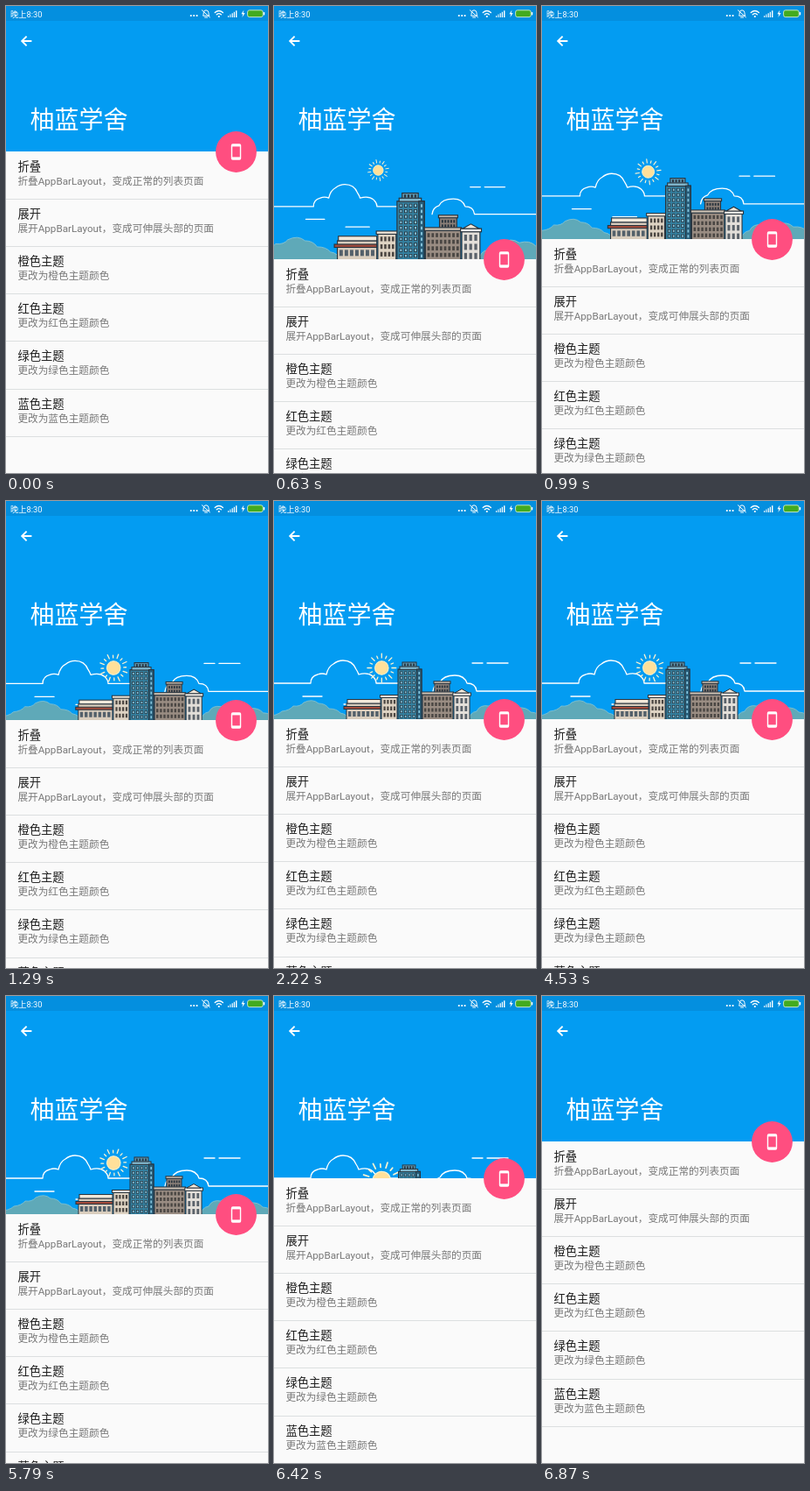
Write an HTML page that moves like this. It is 300 px wide and 533 px high and loops after 6.9 s.

```html
<!DOCTYPE html>
<html lang="zh-CN">
<head>
<meta charset="utf-8">
<title>列表</title>
<style>
html, body { margin: 0; width: 100%; height: 100%; overflow: hidden; background: #fafafa; }
svg { display: block; width: 100%; height: 100%; }
text { font-family: Roboto, "Noto Sans CJK SC", "Noto Sans CJK", sans-serif; }
.line { fill: none; stroke: #fff; stroke-linecap: round; stroke-linejoin: round; }
.title { font-size: 13.33px; fill: #1e1e1e; }
.note { font-size: 11.67px; fill: #787878; }
</style>
</head>
<body>
<svg id="stage" viewBox="0 0 300 533">
  <rect width="300" height="533" fill="#039cf2"/>

  <g id="sky" class="line" stroke-width="1.3">
    <path d="M-10 208H42Q42 200 50 198Q55 196 60 198Q62 189 68 186Q73 182 79 182Q90 182 94 192Q96 195 97 198Q107 195 113 200Q117 204 117 208H142"/>
    <path d="M182 217Q183 209 190 207Q194 199 207 199Q218 199 221 208Q231 208 232 217H315"/>
    <path d="M33 223H55M80 232H108M227 185H239M244 185H268"/>
  </g>

  <g id="sun">
    <circle r="7.8" fill="#ffe09a" stroke="#fff3cf" stroke-width="1"/>
    <g id="rays" stroke="#fff3cf" stroke-width="1.3" stroke-linecap="round"></g>
  </g>

  <g id="town" stroke="#28333d" stroke-width="1"></g>

  <g id="list">
    <rect width="300" height="533" fill="#fafafa"/>
    <g id="rows"></g>
    <circle cx="263.5" cy=".5" r="23.4" fill="#ff4e80"/>
    <rect x="257.8" y="-8.8" width="11.4" height="18.6" rx="1.8" fill="#fff"/>
    <rect x="259.2" y="-5.6" width="8.6" height="12" fill="#ff4e80"/>
  </g>

  <rect width="300" height="17" fill="#048fdf"/>
  <text x="5" y="12.6" font-size="9.3" fill="#fff">晚上8:30</text>
  <g fill="#fff">
    <circle cx="211.8" cy="11" r="1.1"/><circle cx="215.2" cy="11" r="1.1"/><circle cx="218.6" cy="11" r="1.1"/>
    <path d="M254.2 13V11H255.2V13ZM256.4 13V9.6H257.4V13ZM258.6 13V8.2H259.8V13ZM260.8 13V6.8H262V13ZM263 13V5.2H264.4V13Z"/>
    <path d="M272.4 4.6L269.4 9.3H271.3L270.4 13L273.6 7.9H271.6Z"/>
    <circle cx="243.8" cy="12" r="1.1"/>
  </g>
  <g class="line" stroke-width="1">
    <path d="M225.8 10.8Q226.2 9.8 226.2 7.8Q226.4 4.8 229 4.8Q231.8 4.8 232 7.8Q232 9.8 232.6 10.8ZM227.6 13H230.6M224.4 4.8L233.4 12.8"/>
    <path d="M239.2 7.6Q243.8 3.4 248.4 7.6M241.2 9.8Q243.8 7.4 246.4 9.8" stroke-width="1.3"/>
    <path d="M29.4 40H18.2M23.6 34.6L18.2 40L23.6 45.4" stroke-width="1.9" stroke-linecap="butt" stroke-linejoin="miter"/>
  </g>
  <rect x="276.6" y="4.8" width="17.6" height="7.8" rx="2.2" fill="#43ab1f" stroke="#cfeecb" stroke-width=".9"/>
  <rect x="294.8" y="7" width="1.4" height="3.4" rx=".6" fill="#fff"/>
  <text x="27.5" y="139.6" font-size="28" fill="#fff">柚蓝学舍</text>
</svg>
<script>
const LOOP = 6900, STEP = 30;
const BASE = 166, OPEN = 83, PULL = 126;
const RELEASE = 845, CLOSE = 6310, SETTLE = 700;
const SPIN = 1000;

const $ = id => document.getElementById(id);
const clamp = x => Math.max(0, Math.min(1, x));
const mix = (a, b, k) => a + (b - a) * k;
const decelerate = x => 1 - (1 - clamp(x)) ** 4;
const range = (n, draw) => Array.from({ length: n }, (_, i) => draw(i)).join('');
const box = (x, y, w, h, fill, extra = '') =>
  `<rect x="${x}" y="${y}" width="${w}" height="${h}" fill="${fill}" ${extra}/>`;
const windows = (x, y, cols, rows, dx, dy, w, h, fill) =>
  range(cols * rows, i => box(x + i % cols * dx, y + Math.floor(i / cols) * dy, w, h, fill, 'stroke="none"'));
const hill = d => `<path d="${d}" fill="#5fa9b8" stroke="#86c4d2" stroke-width=".8"/>`;

function buildTown() {
  const cream = '#f1e8da', dark = '#28333d', stone = '#9a8d83';
  $('town').innerHTML =
    hill('M-10 252V246Q4 245 9 240Q18 239 22 234Q30 235 34 230Q44 225 51 231Q59 231 63 237Q72 237 76 242Q84 243 88 252Z') +
    hill('M222 252Q224 241 232 240Q236 232 246 234Q254 227 263 233Q273 230 279 236Q289 235 294 241Q304 241 310 252Z') +
    // low hall
    box(83, 231, 39, 20, '#d9cdbd') + box(80, 234.5, 42, 3, '#a34c3c') + box(84, 226.5, 38, 4.5, cream) +
    windows(85, 240, 7, 1, 5.2, 1, 3.4, 6, '#53606a') +
    // annex
    box(123, 224, 18, 27, '#ded3c3') + box(121.5, 221.5, 21, 3, cream) +
    windows(125.5, 227, 4, 3, 3.8, 7.5, 2.2, 4.5, '#4a4541') +
    // tower
    box(147, 184, 16, 6, '#5c93ac') + windows(149, 185.5, 4, 1, 3.4, 1, 1.8, 3, dark) +
    box(142, 192, 27, 59, '#35809f') + box(144, 189, 22, 3.4, '#7fb4c9') +
    box(163.5, 192, 5.5, 59, '#265c78') +
    windows(144.2, 194.5, 4, 10, 4.8, 5.5, 3.2, 3.6, dark) +
    windows(145, 195.2, 4, 10, 4.8, 5.5, 1.7, 2.2, '#83c3dc') +
    windows(165.4, 195, 1, 10, 1, 5.5, 1.7, 3, '#83c3dc') +
    // stone block
    box(184, 208, 17, 12, '#8b8079') + box(183, 205.8, 19, 2.6, '#c0b4a7') +
    windows(186, 210.5, 5, 2, 2.9, 4.4, 1.7, 2.8, dark) +
    box(170, 221, 35, 30, stone) + box(169, 218, 36.5, 3, '#cfc3b5') +
    windows(172, 223.5, 8, 4, 4.1, 6.5, 2.4, 4, '#4a4643') +
    // columned house
    box(206, 222, 18, 29, '#e3dfd9') + box(204.8, 219, 20.6, 3.2, '#f7f3ec') +
    `<path d="M207 219L215 214.5L223 219Z" fill="${cream}"/>` +
    windows(208.4, 225, 3, 3, 5, 9, 2.8, 6, '#5a626a');
}

function buildRows() {
  const rows = [
    ['折叠', '折叠AppBarLayout，变成正常的列表页面'],
    ['展开', '展开AppBarLayout，变成可伸展头部的页面'],
    ...['橙', '红', '绿', '蓝'].map(c => [c + '色主题', `更改为${c}色主题颜色`])
  ];
  $('rows').innerHTML = rows.map(([title, note], i) => {
    const y = i * 54.15;
    return `<text class="title" x="13.4" y="${y + 21.8}">${title}</text>` +
      `<text class="note" x="13.4" y="${y + 37.8}">${note}</text>` +
      box(0, Math.round(y + 54), 300, 1, '#dcdfe0');
  }).join('');
}

function pullOffset(t) {
  if (t < RELEASE) return PULL * (1 - Math.cos(Math.PI * clamp((t - 15) / 685))) / 2;
  if (t < CLOSE) return mix(PULL, OPEN, decelerate((t - RELEASE) / SETTLE));
  return OPEN * (1 - decelerate((t - CLOSE) / SETTLE));
}

// Scales a group around a pivot and shifts it down.
function place(id, x, y, shift, scale) {
  $(id).setAttribute('transform', `translate(${x} ${y + shift}) scale(${scale}) translate(${-x} ${-y})`);
}

function draw(t) {
  const offset = pullOffset(t);
  const p = offset / OPEN;
  const extra = Math.max(0, offset - OPEN);
  const k = extra / 40;

  place('sky', 150, 208, 21 * k, 1 - .03 * k);
  const townScale = 1 + (p - 1) * (p > 1 ? .33 : .154);
  place('town', 149, 249, extra + Math.max(0, 1 - p) * 8, townScale);

  const sunScale = p > 1 ? mix(1, .74, k) : mix(1.33, 1, clamp((p - .5) * 2));
  const sunY = p > 1 ? mix(190.5, 187.5, k) : 190.5 + 41 * (1 - p);
  const turn = t < RELEASE ? 360 * p * 1.5 : -360 * (t - RELEASE) / SPIN;
  $('sun').setAttribute('transform',
    `translate(${mix(123.3, 119.3, k)} ${sunY}) scale(${sunScale}) rotate(${turn})`);

  $('list').setAttribute('transform', `translate(0 ${Math.round(BASE + offset)})`);
}

buildTown();
buildRows();
$('rays').innerHTML = range(16, i => `<path d="M0 -11.6V${i % 2 ? -14.4 : -16.4}" transform="rotate(${i * 22.5})"/>`);

const start = performance.now();
function tick(now) {
  const t = Math.max(0, now - start) % LOOP;
  draw(Math.floor(t / STEP) * STEP);
  requestAnimationFrame(tick);
}
draw(0);
requestAnimationFrame(tick);
</script>
</body>
</html>
```
